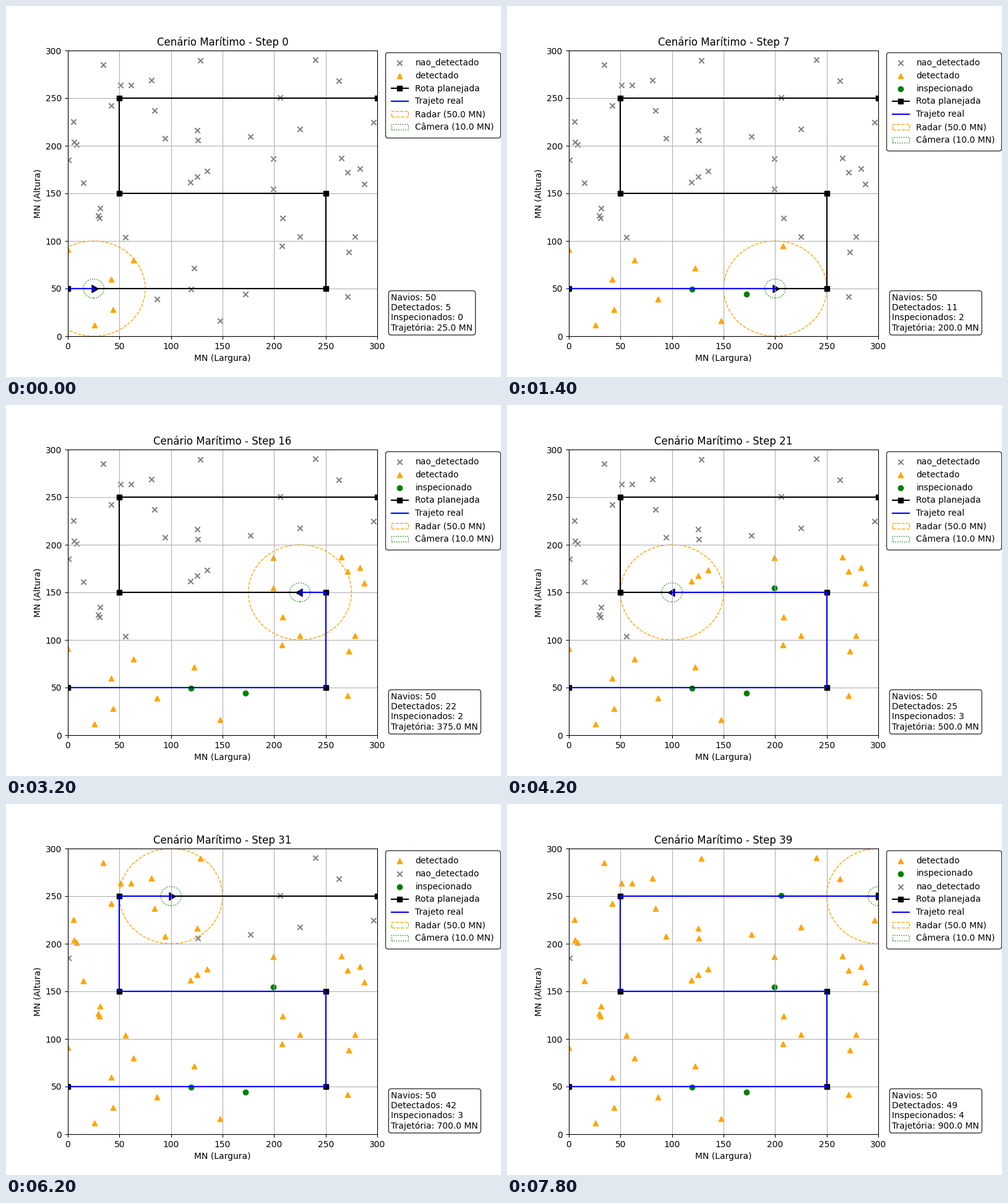
A matplotlib script for the animation above (8 s loop, 800 by 600 pixels).

```python
import numpy as np
import matplotlib.pyplot as plt
from matplotlib.animation import FuncAnimation

SIZE, SHIPS, STEPS = 300, 50, 40
SPEED, RADAR, CAMERA = 25.0, 50.0, 10.0
ROUTE = np.array([(0, 50), (250, 50), (250, 150), (50, 150), (50, 250), (300, 250)], float)
UNSEEN, SEEN, CHECKED = "nao_detectado", "detectado", "inspecionado"
STYLE = {UNSEEN: ("gray", "x"), SEEN: ("orange", "^"), CHECKED: ("green", "o")}

np.random.seed(1)
ships = np.random.rand(SHIPS, 2) * SIZE


def simulate():
    """Sail the route; return (track, heading, ship states) for every step."""
    pos, heading, leg = ROUTE[0].copy(), 0.0, 1
    track, states, log = [pos.copy()], [UNSEEN] * SHIPS, []
    for _ in range(STEPS):
        gap = ROUTE[leg] - pos
        dist = np.hypot(*gap)
        if dist < SPEED:  # one step is spent turning at each waypoint
            pos = ROUTE[leg].copy()
            leg = min(leg + 1, len(ROUTE) - 1)
        else:
            heading = np.degrees(np.arctan2(gap[1], gap[0]))
            pos = pos + gap / dist * SPEED
        track.append(pos.copy())
        for i, d in enumerate(np.hypot(*(ships - pos).T)):
            if d <= CAMERA:
                states[i] = CHECKED
            elif d <= RADAR and states[i] == UNSEEN:
                states[i] = SEEN
        log.append((np.array(track), heading, list(states)))
    return log


log = simulate()
fig, ax = plt.subplots(figsize=(8, 6), dpi=100)
fig.subplots_adjust(right=0.75)


def ring(center, radius, color, style, name):
    ax.add_patch(plt.Circle(center, radius, color=color, fill=False,
                            linestyle=style, label=f"{name} ({radius} MN)"))


def draw(step):
    track, heading, states = log[step]
    pos = track[-1]
    ax.clear()
    ax.set(xlim=(0, SIZE), ylim=(0, SIZE), xlabel="MN (Largura)",
           ylabel="MN (Altura)", title=f"Cenário Marítimo - Step {step}")
    ax.grid(True)

    for state in dict.fromkeys(states):
        color, marker = STYLE[state]
        pts = ships[[s == state for s in states]]
        ax.scatter(*pts.T, c=color, marker=marker, label=state)
    ax.plot(*ROUTE.T, "ks-", label="Rota planejada")
    ax.plot(*track.T, "b-", label="Trajeto real")
    ax.scatter(*pos, s=100, c="blue", edgecolors="black", marker=(3, 0, heading - 90))
    ring(pos, RADAR, "orange", "--", "Radar")
    ring(pos, CAMERA, "green", ":", "Câmera")

    frame = ax.legend(loc="upper left", bbox_to_anchor=(1.02, 1)).get_frame()
    frame.set_boxstyle("round", pad=0.3)
    frame.set_edgecolor("black")

    length = np.hypot(*np.diff(track, axis=0).T).sum()
    info = (f"Navios: {SHIPS}\n"
            f"Detectados: {SHIPS - states.count(UNSEEN)}\n"
            f"Inspecionados: {states.count(CHECKED)}\n"
            f"Trajetória: {length:.1f} MN")
    ax.text(1.045, 0.15, info, transform=ax.transAxes, va="top",
            bbox=dict(boxstyle="round", facecolor="white", alpha=0.8))


anim = FuncAnimation(fig, draw, frames=STEPS, interval=200,
                     init_func=lambda: None, repeat=True, repeat_delay=0)
plt.show()
```
